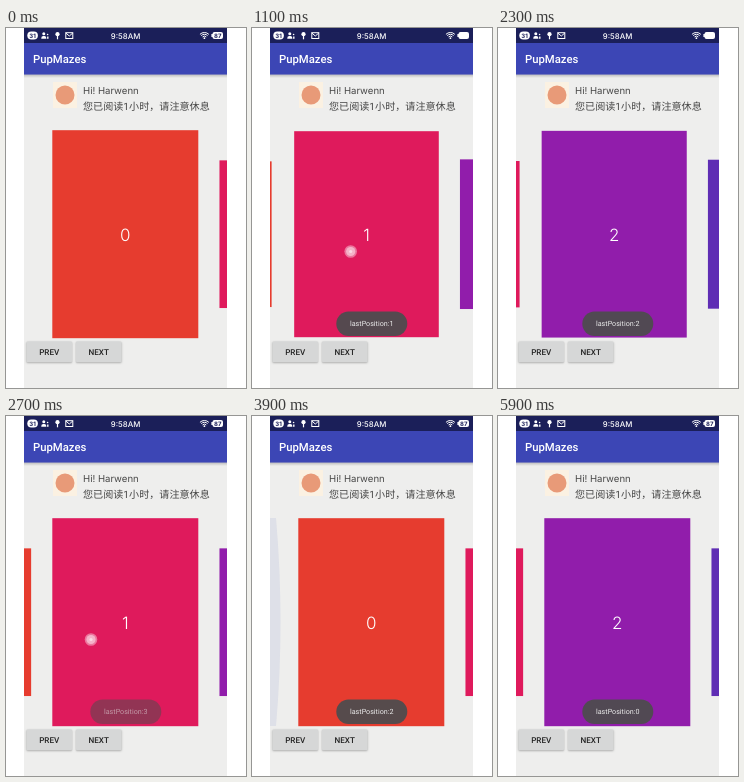
Recreate the animation shown at these times as an HTML page with a canvas. Size 240 by 360 pixels, loop 6 s.

```html
<!DOCTYPE html>
<html lang="zh">
<head>
<meta charset="utf-8">
<title>Card pager</title>
<style>
html, body { margin: 0; width: 100%; height: 100%; overflow: hidden; background: #fff; }
canvas { display: block; width: 240px; height: 360px; }
</style>
</head>
<body>
<canvas id="stage"></canvas>
<script>
const LOOP = 6000;
const LEFT = 18, RIGHT = 221;
const CENTER_X = 119.3, CENTER_Y = 206.2, CARD_W = 146, CARD_H = 208;
const SIDE_SCALE = 0.71;
const COLORS = ['#e63c2f', '#df1a5c', '#911dab', '#5f2db4', '#3949ab'];
const NAVY = '#1b1f59';
const ROBOTO = 'Roboto, "Noto Sans CJK SC", "Noto Sans CJK", sans-serif';
const INTER = 'Inter, sans-serif';

// Each swipe: start, end, page it lands on.
const SWIPES = [
  [480, 900, 1], [1052, 1502, 2], [1560, 1860, 3], [1890, 2340, 2],
  [2360, 2680, 1], [2700, 3060, 0], [3920, 4200, 1], [4209, 4659, 2]
];
// Toasts queue up and play one after another.
const TOASTS = [1, 2, 3, 2, 1, 0];
const TOAST_START = 695, TOAST_PERIOD = 950, TOAST_FADE = 190;
const SOLID_BATTERY = [[600, 1500], [1900, 2700], [4200, 5000]];

const canvas = document.getElementById('stage');
const ctx = canvas.getContext('2d');
const ratio = window.devicePixelRatio || 1;
canvas.width = 240 * ratio;
canvas.height = 360 * ratio;
ctx.textRendering = 'geometricPrecision';

const clamp = v => Math.max(0, Math.min(1, v));
const smooth = u => u * u * (3 - 2 * u);

function rect(x, y, w, h, color) {
  ctx.fillStyle = color;
  ctx.fillRect(x, y, w, h);
}

function rounded(x, y, w, h, r, color) {
  ctx.fillStyle = color;
  ctx.beginPath();
  ctx.roundRect(x, y, w, h, r);
  ctx.fill();
}

function circle(x, y, r, color) {
  ctx.fillStyle = color;
  ctx.beginPath();
  ctx.arc(x, y, r, 0, Math.PI * 2);
  ctx.fill();
}

function text(str, x, y, font, color, align = 'left') {
  ctx.font = font;
  ctx.textAlign = align;
  ctx.fillStyle = color;
  ctx.fillText(str, x, y);
}

function fadeDown(y, h, alpha) {
  const g = ctx.createLinearGradient(0, y, 0, y + h);
  g.addColorStop(0, `rgba(0,0,0,${alpha})`);
  g.addColorStop(1, 'rgba(0,0,0,0)');
  return g;
}

function pagerState(t) {
  let page = 0, dot = null;
  for (const [start, end, to] of SWIPES) {
    if (t < start) break;
    const u = clamp((t - start) / (end - start));
    const moved = (to - page) * smooth(u);
    if (u < 0.5) dot = (to > page ? 103.5 : 85) - moved * CARD_W;
    page += moved;
  }
  return { page, dot };
}

function drawBattery(t) {
  const solid = SOLID_BATTERY.some(([a, b]) => t >= a && t < b);
  rounded(206.5, 4, 10.5, 7, 2, '#fff');
  rect(205.4, 6, 1.5, 3, '#fff');
  if (!solid) text('87', 211.8, 9.8, `700 6px ${INTER}`, NAVY, 'center');
}

function drawStatusBar(t) {
  rect(LEFT, 0, RIGHT - LEFT, 15, NAVY);
  rounded(21.3, 3.4, 10.6, 8.2, 4.1, '#fff');
  text('31', 26.6, 9.7, `700 6px ${INTER}`, NAVY, 'center');
  circle(37.8, 5.8, 1.5, '#fff');
  rounded(35.3, 8, 5, 2.8, [2, 2, 0, 0], '#fff');
  circle(41.6, 6.5, 0.8, '#fff');
  rect(41.1, 8.5, 1.4, 2.3, '#fff');
  circle(51.5, 6.2, 2.1, '#fff');
  rect(50.9, 7.5, 1.2, 3.8, '#fff');
  ctx.strokeStyle = '#fff';
  ctx.lineWidth = 1;
  ctx.strokeRect(59.8, 4.7, 7, 5.8);
  ctx.beginPath();
  ctx.moveTo(59.8, 5);
  ctx.lineTo(63.3, 8);
  ctx.lineTo(66.8, 5);
  ctx.stroke();
  text('9:58AM', 119.6, 10.8, `500 7.8px ${INTER}`, '#fff', 'center');
  for (const r of [2.6, 4.5, 6.3]) {
    ctx.beginPath();
    ctx.arc(198.4, 10.8, r, -Math.PI * 0.75, -Math.PI * 0.25);
    ctx.stroke();
  }
  circle(198.4, 10.2, 0.9, '#fff');
  drawBattery(t);
}

function drawHeader() {
  rect(LEFT, 15, RIGHT - LEFT, 31.6, '#3c46b5');
  rect(LEFT, 46.6, RIGHT - LEFT, 3.4, fadeDown(46.6, 3.4, 0.2));
  text('PupMazes', 27, 35, `500 11.3px ${ROBOTO}`, '#fff');
  rect(47, 54, 24, 26, '#fbf1e2');
  circle(59, 67, 9.5, '#e89a78');
  text('Hi! Harwenn', 77, 66, `400 9.6px ${INTER}`, '#484848');
  text('您已阅读1小时，请注意休息', 77, 81.5, `400 10.1px ${ROBOTO}`, '#444');
}

function drawCard(index, page) {
  const offset = index - page;
  const scale = 1 - (1 - SIDE_SCALE) * Math.min(1.05, Math.abs(offset));
  ctx.save();
  ctx.translate(CENTER_X + offset * CARD_W, CENTER_Y);
  ctx.scale(scale, scale);
  rect(-CARD_W / 2, -CARD_H / 2, CARD_W, CARD_H, COLORS[index]);
  text(String(index), 0, 7.2, `300 17px ${INTER}`, '#fff', 'center');
  ctx.restore();
}

function drawEdgeGlow(t) {
  const pull = smooth(clamp((t - 3500) / 300)) * (1 - clamp((t - 3920) / 180));
  if (pull <= 0) return;
  ctx.fillStyle = 'rgba(63,81,181,0.09)';
  ctx.beginPath();
  ctx.moveTo(LEFT, 102);
  ctx.lineTo(LEFT + 6 * pull, 102);
  ctx.quadraticCurveTo(LEFT + 15 * pull, CENTER_Y, LEFT + 6 * pull, 310);
  ctx.lineTo(LEFT, 310);
  ctx.fill();
}

function drawButton(x, label) {
  ctx.save();
  ctx.shadowColor = 'rgba(0,0,0,0.3)';
  ctx.shadowBlur = 2 * ratio;
  ctx.shadowOffsetY = ratio * 0.7;
  rounded(x, 313.6, 45.5, 20.7, 1, '#d6d7d7');
  ctx.restore();
  text(label, x + 22.7, 326.8, `500 8.1px ${ROBOTO}`, '#222', 'center');
}

function drawTouch(x) {
  circle(x, 223.5, 6.3, 'rgba(255,255,255,0.4)');
  circle(x, 223.5, 4.6, 'rgba(255,255,255,0.45)');
  circle(x, 223.5, 1.6, 'rgba(255,255,255,0.5)');
}

function drawToast(t) {
  const age = t - TOAST_START;
  if (age < 0) return;
  const index = Math.floor(age / TOAST_PERIOD);
  const local = age % TOAST_PERIOD;
  ctx.globalAlpha = Math.min(clamp(local / TOAST_FADE), clamp((TOAST_PERIOD - local) / TOAST_FADE));
  rounded(84.3, 283.5, 71, 24.5, 12.2, 'rgba(78,76,79,0.95)');
  text('lastPosition:' + TOASTS[index], 119.7, 298, `400 7.15px ${ROBOTO}`, '#ececec', 'center');
  ctx.globalAlpha = 1;
}

function draw(t) {
  const { page, dot } = pagerState(t);
  ctx.setTransform(ratio, 0, 0, ratio, 0, 0);
  rect(0, 0, 240, 360, '#fff');
  ctx.save();
  ctx.beginPath();
  ctx.rect(LEFT, 0, RIGHT - LEFT, 360);
  ctx.clip();
  rect(LEFT, 0, RIGHT - LEFT, 360, '#eeeeed');
  drawHeader();
  COLORS.forEach((_, i) => drawCard(i, page));
  drawEdgeGlow(t);
  drawButton(20.5, 'PREV');
  drawButton(70, 'NEXT');
  drawToast(t);
  if (dot !== null) drawTouch(dot);
  drawStatusBar(t);
  ctx.restore();
}

function frame() {
  draw(performance.now() % LOOP);
  requestAnimationFrame(frame);
}
frame();
</script>
</body>
</html>
```
